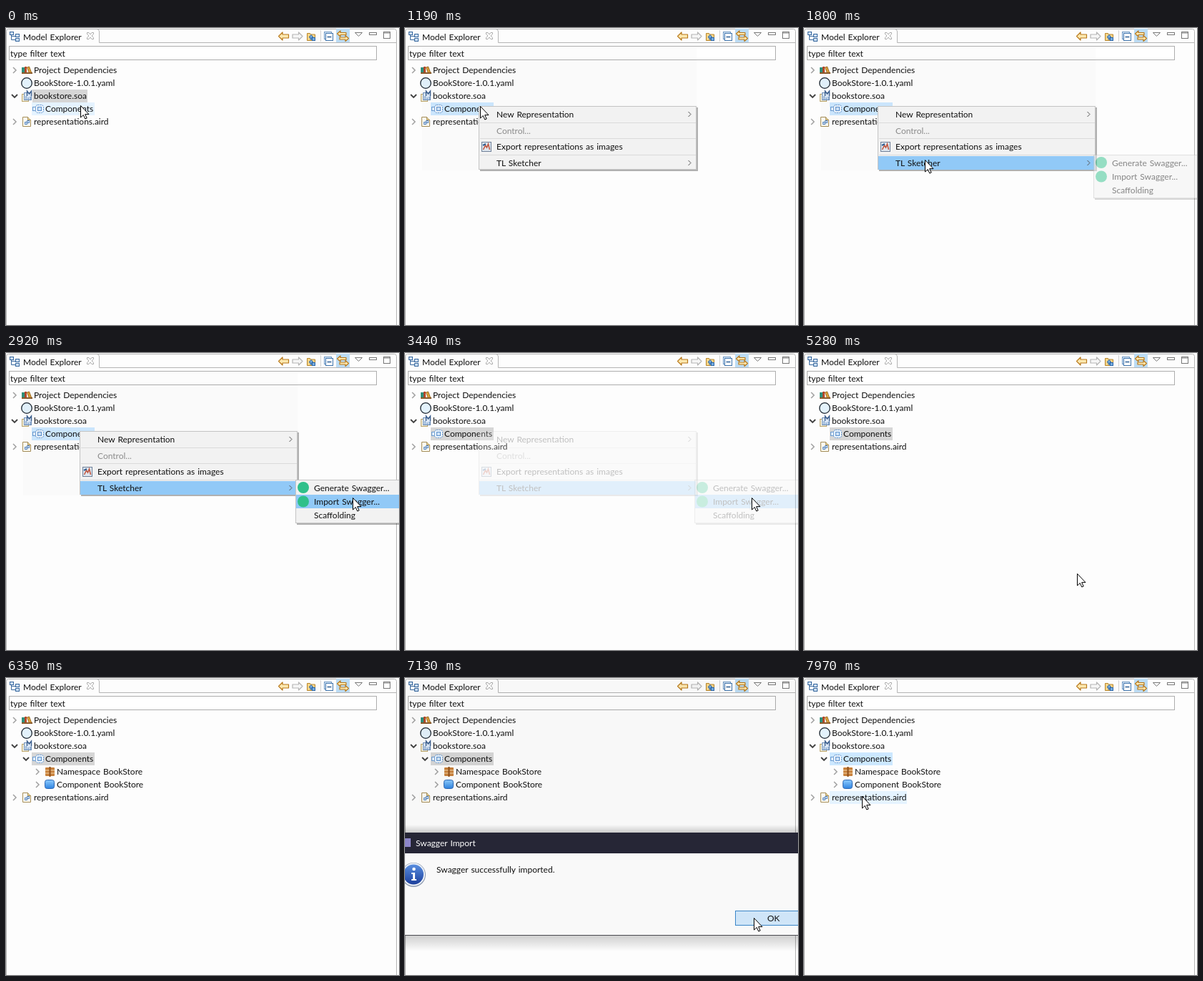
Recreate the animation shown at these times as an HTML page. Size 550 px wide and 415 px high, loop 8 s.

```html
<!DOCTYPE html>
<html lang="en">
<head>
<meta charset="utf-8">
<title>Model Explorer</title>
<style>
  html, body { margin: 0; width: 100%; height: 100%; overflow: hidden; background: #fdfdfd; }
  svg { display: block; width: 550px; height: 415px; }
  text { font: 12px Lato, "Open Sans", sans-serif; word-spacing: 0.9px; white-space: pre; }
</style>
</head>
<body>
<svg id="stage" viewBox="0 0 550 415" xmlns="http://www.w3.org/2000/svg"></svg>
<script>
const LOOP = 8000, STEP = 120;
const GREY = '#d6d6d6', HOVER = '#e5f3ff', ACTIVE = '#cce8ff', MENU_BLUE = '#91c9f7';

const rect = (x, y, w, h, fill, extra = '') =>
  `<rect x="${x}" y="${y}" width="${w}" height="${h}" fill="${fill}" ${extra}/>`;
const frame = (x, y, w, h, stroke, fill = 'none', extra = '') =>
  rect(x + .5, y + .5, w - 1, h - 1, fill, `stroke="${stroke}" ${extra}`);
const path = (d, stroke, fill = 'none', extra = '') =>
  `<path d="${d}" stroke="${stroke}" fill="${fill}" ${extra}/>`;
const label = (x, y, s, fill = '#111') => `<text x="${x}" y="${y}" fill="${fill}">${s}</text>`;
const circle = (x, y, r, fill, extra = '') => `<circle cx="${x}" cy="${y}" r="${r}" fill="${fill}" ${extra}/>`;
const group = (id, content, extra = '') => `<g id="${id}" ${extra}>${content}</g>`;
const closedArrow = (x, y) => path(`M${x} ${y - 4}l4 4l-4 4`, '#a0a0a0', 'none', 'stroke-width="1.5"');
const openArrow = (x, y) => path(`M${x} ${y - 2}l4 4l4-4`, '#404040', 'none', 'stroke-width="1.8"');

// Icons, each placed by its top-left corner
const icons = {
  books: (x, y) => rect(x, y + 3, 4, 8, '#2f8f7a') + rect(x + 4, y + 2, 3, 9, '#b5482c') +
    path(`M${x + 7.5} ${y + 3}l3-1l3 8l-3 1z`, '#9a6a22', '#e0a63c') + rect(x, y + 10, 15, 2, '#8a5a2b'),
  yaml: (x, y) => circle(x + 7, y + 7, 7.3, '#e3f2fc', 'stroke="#1c2630" stroke-width="1.3"'),
  soa: (x, y) => frame(x, y + 4, 10, 11, '#b9a36a', '#f6f0da') + frame(x + 3, y + 2, 11, 11, '#6f8fb8', '#dbe8f7') +
    path(`M${x + 6} ${y + 13}v-6M${x + 9} ${y + 13}v-4M${x + 12} ${y + 13}v-5`, '#5580b4') +
    path(`M${x + 7.5} ${y + 7}v-7l3 4l3-4v7`, '#3c5f8e', 'none', 'stroke-width="1.4"'),
  components: (x, y) => frame(x, y + 4, 5, 6, '#6b9bd0', '#e3effb') +
    rect(x + 4.5, y + 1.5, 11, 11, '#edf5fd', 'rx="3" stroke="#5c90cb" stroke-dasharray="2 1"') +
    frame(x + 7, y + 4, 6, 6, '#5c90cb', '#cfe3f7'),
  diagram: (x, y) => path(`M${x + .5} ${y + .5}h7l4 4v9h-11z`, '#a58d57', '#fdfbf2') +
    path(`M${x + 7.5} ${y + .5}v4h4`, '#a58d57', '#ecd9a0') +
    frame(x + 3, y + 7, 4, 4, '#5c88bd', '#cfe0f4') + frame(x + 6, y + 5, 4, 4, '#5c88bd', '#cfe0f4'),
  namespace: (x, y) => rect(x, y + 1, 13, 12, '#c8813b', 'rx="1"') +
    path(`M${x} ${y + 5}h13M${x} ${y + 9}h13`, '#f4d6ab') +
    path(`M${x + 6.5} ${y}v14`, '#8d4f1c', 'none', 'stroke-width="2"'),
  component: (x, y) => rect(x + .5, y + .5, 13, 12, 'url(#glass)', 'rx="3" stroke="#2f68b5"')
};

const row = (y, icon, ix, name, tx, arrow = '') => arrow + icons[icon](ix, y - 7) + label(tx, y + 4, name);

const toolArrow = (d, stroke, fill) => path(d, stroke, fill, 'stroke-width="1.2" stroke-linejoin="round"');

const header =
  path('M.5 415V4.5Q.5 1.5 3.5 1.5H543.5Q546.5 1.5 546.5 4.5V415', '#b4b4b4') +
  path('M130.5 20.5V5Q130.5 1.5 127 1.5M130.5 20.5H546', '#b4b4b4') +
  frame(5, 5, 6, 5, '#39699f', '#cfe1f4') + frame(13, 8, 6, 5, '#39699f', '#cfe1f4') +
  frame(13, 14, 6, 5, '#39699f', '#cfe1f4') + path('M7.5 10v6.5H13M7.5 11.5H13', '#39699f') +
  label(24, 17, 'Model Explorer') +
  path('M113.5 6.5h2.5l2 2.5l2-2.5h2.5v2l-2.5 2.5l2.5 2.5v2h-2.5l-2-2.5l-2 2.5h-2.5v-2l2.5-2.5l-2.5-2.5z', '#a9a9a9', '#fff') +
  toolArrow('M381.5 11.5l5.5-5.5v3h8.5v5h-8.5v3z', '#b8791c', '#fde9b0') +
  toolArrow('M415 11.5l-5.5-5.5v3h-8.5v5h8.5v3z', '#b5b5b5', '#f6f6f6') +
  path('M421.5 17.5v-10h4l1 1.5h6v8.5z', '#b8862b', '#f6d689') +
  path('M424 13l3-3.5l3 3.5h-2v3h-2v-3z', '#2d67a8', '#79aee0') + frame(428, 13, 5, 5, '#2d67a8', '#79aee0') +
  path('M440.5 3v16', '#d0d0d0') +
  frame(445, 5, 11, 11, '#6a96c4', '#e2eefa') + frame(447, 7, 11, 11, '#3f74ac', '#fff') +
  path('M449.5 12.5h6', '#2c5f96', 'none', 'stroke-width="1.5"') +
  rect(462, 1, 19, 19, '#bcdcf4') +
  toolArrow('M463.5 8l4.5-4v2.5h8v3h-8v2.5z', '#b8791c', '#fde9b0') +
  toolArrow('M479.5 14.5l-4.5-4v2.5h-8v3h8v2.5z', '#b8791c', '#fde9b0') +
  path('M488.5 6.5h10l-5 5z', '#777', '#fff') +
  frame(508, 6, 11, 4, '#777', '#fff') + frame(528, 5, 10, 10, '#777', '#fff') + path('M528 7h10', '#777') +
  frame(4, 25, 515, 20, '#adadad', '#fff') + label(6, 40, 'type filter text');

const tree =
  rect(37, 86, 77, 18, GREY, 'id="soaMark"') + rect(36, 104, 88, 18, HOVER, 'id="componentsMark"') +
  row(59, 'books', 22, 'Project Dependencies', 39, closedArrow(10, 59)) +
  row(77, 'yaml', 22, 'BookStore-1.0.1.yaml', 39) +
  row(95, 'soa', 22, 'bookstore.soa', 39, openArrow(8, 95)) +
  row(113, 'components', 37, 'Components', 55) +
  group('children', openArrow(24, 113) +
    row(131, 'namespace', 55, 'Namespace BookStore', 71, closedArrow(42, 131)) +
    row(149, 'component', 54, 'Component BookStore', 71, closedArrow(42, 149))) +
  group('airdRow', rect(36, 122, 108, 18, HOVER, 'id="airdMark"') +
    row(131, 'diagram', 23, 'representations.aird', 39, closedArrow(10, 131)));

const panel = (x, y, w, h) => rect(x + 2, y + 2, w, h, '#000', 'opacity=".3"') +
  frame(x, y, w, h, '#c4c4c4', '#f2f2f2');
const menuArrow = y => path(`M396.5 ${y - 3.5}l3.5 3.5l-3.5 3.5`, '#555');

const menu = group('menu',
  rect(24, 27, 384, 172, '#000', 'opacity=".012"') +
  panel(103, 109, 305, 89) +
  rect(104, 179, 303, 19, MENU_BLUE, 'id="menuMark"') +
  path('M105 132.5h302M105 154.5h302M105 177.5h302', '#dadada') +
  label(128, 125, 'New Representation') + menuArrow(120.5) +
  label(128, 148, 'Control...', '#8b8b8b') +
  frame(107, 159, 14, 14, '#6f8099', '#dfe7ef') +
  path('M109.5 170l3-6l2 3l2-5l2 8', '#c0553f', 'none', 'stroke-width="1.6"') +
  path('M109 164l4-2', '#315f93', 'none', 'stroke-width="2"') +
  label(128, 170, 'Export representations as images') +
  label(128, 193, 'TL Sketcher') + menuArrow(188.5));

const submenu = group('submenu',
  panel(405, 177, 150, 61) +
  rect(406, 198, 150, 19, MENU_BLUE, 'id="submenuMark"') +
  circle(416, 188, 8, '#2fc08a') + circle(416, 207.5, 8, '#2fc08a') +
  label(431, 193, 'Generate Swagger...') + label(431, 212, 'Import Swagger...') + label(431, 231, 'Scaffolding'));

const dialog = group('dialog',
  rect(0, 0, 550, 216, '#000', 'opacity=".018"') +
  rect(0, 205, 550, 11, 'url(#shade)', 'transform="matrix(1 0 0 -1 0 421)"') +
  rect(0, 360, 550, 22, 'url(#shade)') +
  rect(0, 216, 550, 144, '#4a4a50') + rect(0, 216, 550, 29, '#262636') + rect(0, 245, 550, 114, '#f9f9f9') +
  rect(-3, 224, 11, 12, '#8d86c9') + label(15, 235, 'Swagger Import', '#fff') +
  circle(12, 275, 17, '#8e9bb0') + circle(12, 274.5, 16, '#eef2f8') + circle(12, 274.5, 14, 'url(#info)') +
  circle(12.5, 267, 2.3, '#fff') + path('M9 272h5v9h2v2h-7v-2h2v-7h-2z', 'none', '#fff') +
  label(44, 272, 'Swagger successfully imported.') +
  frame(462, 325, 110, 21, '#3a86c8', '#e1e1e1', 'id="okButton"') + label(507, 340, 'OK'));

const gradient = (id, from, to) => `<linearGradient id="${id}" x2="0" y2="1">
  <stop stop-color="${from}"/><stop offset="1" stop-color="${to}"/></linearGradient>`;

const stage = document.getElementById('stage');
stage.innerHTML = `<defs>${gradient('glass', '#8ccbff', '#2f83e0')}${gradient('info', '#5a8fe0', '#1c3f9c')}
  ${gradient('shade', '#0000002e', '#00000000')}</defs>` +
  rect(0, 0, 550, 415, '#fdfdfd') + header + tree + menu + submenu + dialog +
  group('cursor', path('M.5 .5V17L4.3 13.5L6.8 19L9.2 18L6.7 12.6H12Z', '#000', '#fff', 'stroke-linejoin="round"'));

const $ = id => document.getElementById(id);
const set = (id, attributes) => {
  const node = $(id);
  for (const name in attributes) node.setAttribute(name, attributes[name]);
};

// Pointer path: glide from one point to another in equal hops; null hides it
const glide = (start, hops, [x0, y0], [x1, y1]) => Array.from({ length: hops }, (_, i) => {
  const k = (i + 1) / hops;
  return [start + i * STEP, [Math.round(x0 + (x1 - x0) * k), Math.round(y0 + (y1 - y0) * k)]];
});
const pointer = [
  [0, [104, 108]], [1190, [105, 109]],
  ...glide(1310, 3, [105, 109], [169, 184]),
  ...glide(2290, 4, [169, 184], [470, 187]),
  [2800, [479, 194]], [2920, [485, 202]],
  [4060, [484, 220]], [4180, [483, 266]], [4300, [494, 352]], [4420, null],
  [4800, [0, 0]], ...glide(4920, 5, [0, 0], [477, 385]), [5550, null],
  [6200, [504, 413]], [6350, null],
  [7130, [488, 335]],
  ...glide(7370, 5, [488, 335], [140, 193]), [7970, [81, 165]]
];

// Value of the last entry whose time has come
const at = (track, t) => {
  let value = track[0][1];
  for (const [time, v] of track) if (time <= t) value = v;
  return value;
};
const menuFade = [[0, 0], [810, .5], [940, 1], [3320, .6], [3440, .25], [3560, 0]];
const submenuFade = [[0, 0], [1800, .5], [1920, 1], [3320, .6], [3440, .25], [3560, 0]];
const dialogFade = [[0, 0], [6630, 1], [7250, .5], [7370, 0]];
const componentsFill = [[0, HOVER], [400, ACTIVE], [3320, GREY], [7250, ACTIVE]];
const okFill = [[0, '#e1e1e1'], [7130, '#cfe5f8']];

function draw(t) {
  const spot = at(pointer, t);
  const [x, y] = spot || [-50, -50];
  const expanded = t >= 6200;
  set('cursor', { transform: `translate(${x} ${y})` });
  set('soaMark', { opacity: t < 400 ? 1 : 0 });
  set('componentsMark', { fill: at(componentsFill, t) });
  set('children', { opacity: expanded ? 1 : 0 });
  set('airdRow', { transform: `translate(0 ${expanded ? 36 : 0})` });
  set('airdMark', { opacity: t >= 7970 ? 1 : 0 });
  set('menu', { opacity: at(menuFade, t) });
  set('menuMark', { opacity: t >= 1430 ? 1 : 0, y: t < 1550 ? 157 : 179 });
  set('submenu', { opacity: at(submenuFade, t) });
  set('submenuMark', { opacity: x > 406 ? 1 : 0, y: y < 198 ? 179 : 198 });
  set('dialog', { opacity: at(dialogFade, t) });
  set('okButton', { fill: at(okFill, t) });
}

function tick() {
  draw(performance.now() % LOOP);
  requestAnimationFrame(tick);
}
tick();
</script>
</body>
</html>
```
